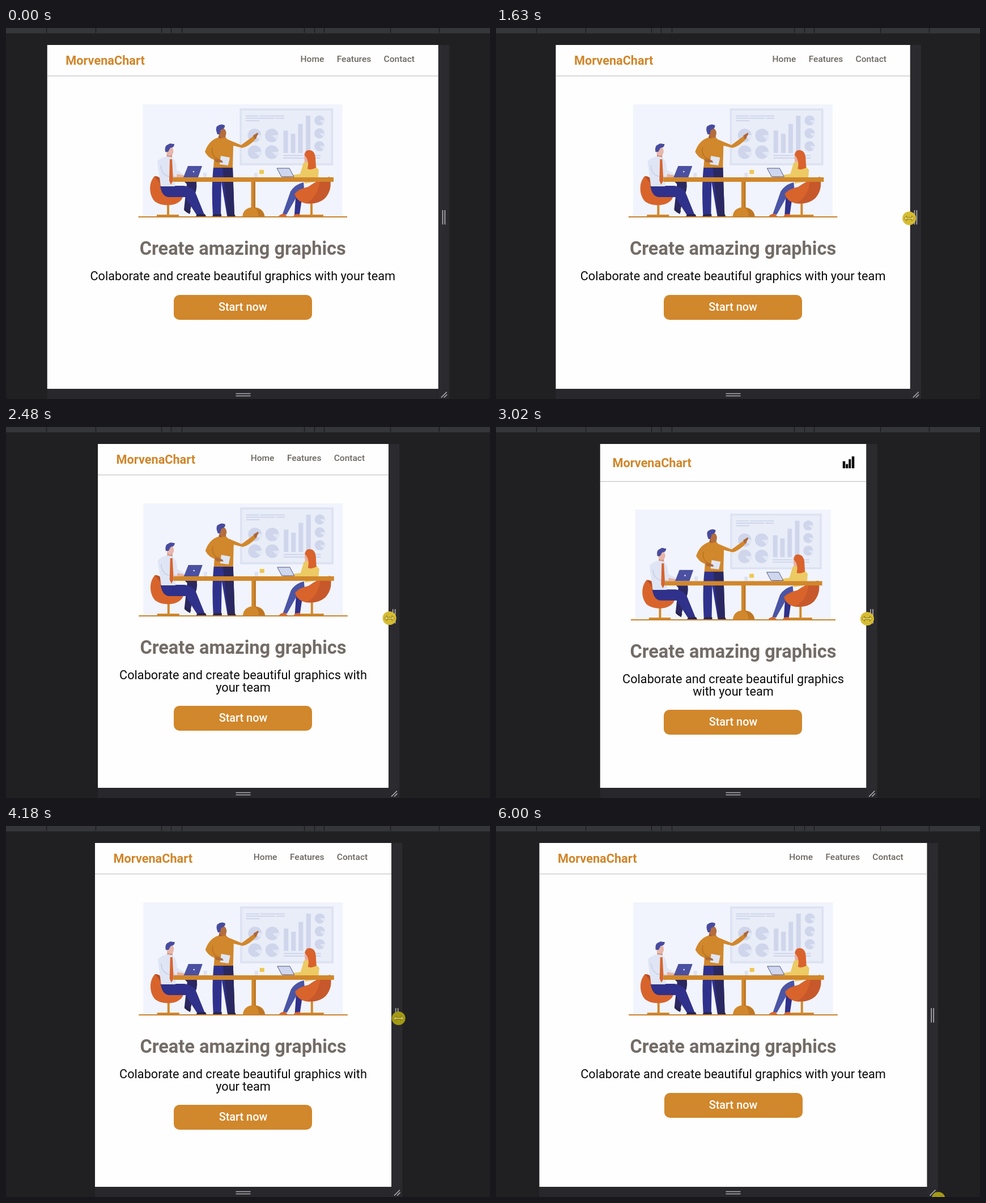
These frames come from a looping animation (854 px wide and 656 px high, 6.23 s). An HTML page:

```html
<!DOCTYPE html>
<html lang="en">
<head>
<meta charset="utf-8">
<title>Responsive page preview</title>
<style>
  html, body { margin: 0; width: 100%; height: 100%; overflow: hidden; background: #202022; }
  body { position: relative; font-family: Roboto, sans-serif; }
  svg { position: absolute; left: 0; top: 0; }
  .logo { font-size: 21.7px; font-weight: 700; fill: #d0862a; }
  .nav { font-size: 15.5px; font-weight: 500; fill: #6b665f; }
  #copy { position: absolute; box-sizing: border-box; padding: 0 34px; text-align: center; line-height: 1; }
  h1 { margin: 0; font-size: 32.55px; font-weight: 700; color: #736c66; }
  p { margin: 21.7px 0; font-size: 21.7px; color: #0c0a0a; }
  .button { display: flex; align-items: center; justify-content: center; width: 244px; height: 44px;
    margin: 0 auto; border-radius: 10px; background: #d1872b; color: #fff; font-size: 19.9px; font-weight: 500; }
</style>
</head>
<body>
<svg width="854" height="656" viewBox="0 0 854 656">
  <rect width="854" height="9.5" fill="#35363a"/>
  <path id="ticks" stroke="#19191b" stroke-width="1.2"/>
  <rect id="foot" y="638" height="18" fill="#28282c"/>
  <path d="M405.5 646.5h26m-26 4h26" stroke="#aeaeb0" stroke-width="1.7"/>
  <g id="grip">
    <rect id="bar" y="30" width="19.5" height="608"/>
    <rect y="638" width="19.5" height="18" fill="#2a2a2e"/>
    <path d="M7.7 322v25.5m4-25.5v25.5M5 653.5l10-10m-5 10l5.5-5.5" stroke="#aeaeb0" stroke-width="1.7"/>
  </g>
  <rect id="page" y="30" height="608" fill="#fefefe"/>
  <rect id="rule" height="1" fill="#b8b7b7"/>
  <text id="logo" class="logo">MorvenaChart</text>
  <g id="nav" class="nav">
    <text x="-243.2" y="60">Home</text><text x="-179" y="60">Features</text><text x="-96.2" y="60">Contact</text>
  </g>
  <path id="menu" d="M-41.5 60.5h4.5v12.5h-4.5zM-36 65.5h4v7.5h-4zM-31 57h4v16h-4zM-25.5 52h4.5v21h-4.5z" fill="#0b0a0a"/>

  <g id="scene">
    <path d="M241.5 135h352v198h-352z" fill="#f1f4fc"/>
    <path d="M414 144h161.5v97h-161.5z" fill="#e9edf8" stroke="#dce2f2" stroke-width="3.5"/>
    <g id="chart" fill="#cfd5eb">
      <path d="M423 154.5h23v2h-23zm25 0h43v2h-43zM423 158.5h51v2h-51zm53 0h15v2h-15zM423 163h24v2h-24z"/>
      <path d="M489.5 181.5h8v39.5h-8zM502.5 187h8v34h-8zM515.5 169.5h8v51.5h-8zM529 155h8v66h-8z"/>
      <path d="M489 224.5h36v2h-36zm38 0h28v2h-28zM489 229h66v2h-66z"/>
    </g>

    <!-- left chair and seated man -->
    <path d="M284 312h4v18h17v4h-39v-4h18z" fill="#d1872b"/>
    <path d="M262 262q14-1 18 22l-10 18z" fill="#b74f27"/>
    <path d="M262 262c-11 12-10 34 1 45q13 9 33 5 16-5 17-18l-31-3q-8-14-20-29z" fill="#d8642c"/>
    <path d="M315 272h21q2 16-6 29l-5 22-11-2 5-45z" fill="#2b2860"/>
    <path d="M272 279h42q16 2 21 14l15 37h-14l-20-31h-28q-13 0-16-20z" fill="#30318a"/>
    <path d="M316 319l10 4-2 6q-5-2-10-7zM337 329h14l2 4h-18z" fill="#272451"/>
    <path d="M284 222h9v10h-10z" fill="#d28f7c"/>
    <ellipse cx="289" cy="218" rx="6.5" ry="8" fill="#e7b6aa"/>
    <path d="M281 219q-2-11 5-13 3-3 8-1h3q0 7-7 7l-4 7z" fill="#484c9f"/>
    <path d="M283 227q-12 3-16 9l6 44h25l2-23 13 5 2-3-14-8q0-18-10-23z" fill="#dfe5f4"/>
    <path d="M273 243q1 15 12 19l17 1" fill="none" stroke="#c6cfe7" stroke-width="1.5"/>
    <path d="M301 258l14 3-1 3h-13z" fill="#e5b2a4"/>
    <path d="M289 232h4l2 38-4 7-3-7z" fill="#d8642c"/>

    <!-- presenter -->
    <path d="M366 246h34l3 86h-13l-10-60-1 60h-14q-3-50 1-86z" fill="#2f328c"/>
    <path d="M382 246h18l3 86h-12z" fill="#2a2860"/>
    <path d="M364 333q2-5 8-4h8v4zM390 333q2-5 13-4l2 4z" fill="#29264f"/>
    <path d="M376 188h11l1 11-15 1z" fill="#9b5930"/>
    <ellipse cx="382" cy="186" rx="6.5" ry="9" fill="#b46d3d"/>
    <path d="M373 188q-4-10-1-14 7-6 14-2 1 6-7 8l-2 8z" fill="#484c9f"/>
    <path d="M373 194q8 2 14-1l4 4 24 10 23-17 4 5q-14 15-25 17l-16-4-1 39h-34l1-14q-10-3-16-14 6-19 22-25z" fill="#d1872b"/>
    <path d="M364 211q-2 12 5 18l10 5" fill="none" stroke="#b87321" stroke-width="1.5"/>
    <path d="M436 190l8-5 1 2-4 8-3 1z" fill="#ad683b"/>
    <path d="M379 226l16 3-3 14-15-2z" fill="#dfe5f4"/>
    <path d="M367 231l14 3 2 4-13-1z" fill="#ad683b"/>

    <!-- right chair and seated woman -->
    <path d="M537 309h4v21h19v4h-41v-4h18z" fill="#d1872b"/>
    <path d="M512 284l12 5-6 41h-9z" fill="#2f318b"/>
    <path d="M525 273q-16 4-23 16l-14 40 7 1 19-34 13-2z" fill="#4b55a5"/>
    <path d="M481 333q4-5 11-4l4 4zM507 333q2-5 11-4l2 4z" fill="#d8642c"/>
    <path d="M526 222h11v17h-10z" fill="#e8af9c"/>
    <path d="M525 238q8-2 17 2l10 11-2 20-23 4-3-10q-14 3-27-1l2-3 20-3z" fill="#ecca64"/>
    <path d="M488 260l12 1-1 4-10-1z" fill="#e8af9c"/>
    <path d="M527 225q0-10 9-9 9 1 10 14l1 17q-9 5-15 2 3-12-2-20z" fill="#d9622d"/>
    <path d="M571 263q6 22-8 38-13 12-35 9-16-4-19-17 8-9 24-12 16-12 38-18z" fill="#c7582b"/>
    <path d="M554 270q-4 30-25 40-16-4-19-17 8-9 24-12 9-8 20-11z" fill="#d8642c"/>

    <!-- table -->
    <path d="M348 256h6v8h-6zM438 256h6v8h-6z" fill="#dce2f2"/>
    <path d="M449 246h4v4l3 3v11h-9v-11l2-3z" fill="#f7f3e9"/>
    <path d="M447 251h8v7h-8z" fill="#ebc75a"/>
    <path d="M321 244h25l-7 20h-26z" fill="#4b50a0"/>
    <circle cx="331" cy="254" r="1.3" fill="#e6e9f6"/>
    <path d="M478 248h22l8 15h-22z" fill="#cfd7ee" stroke="#51557f"/>
    <path d="M295 264h283v8h-283zM432.5 272h7.5v48h-7.5z" fill="#d1872b"/>
    <path d="M417 334q2-17 19.5-17t20 17z" fill="#d1872b"/>
    <path d="M437 272h3v46q15 3 16.5 16h-11q0-13-8.5-17z" fill="#bd7724"/>
    <path d="M233.5 333h368.5v2h-368.5z" fill="#c9822d"/>
  </g>

  <g id="cursor">
    <circle r="12"/>
    <path d="M-9 0l4.5-4.5v3h9v-3l4.5 4.5-4.5 4.5v-3h-9v3z" fill="#f3e58b" fill-opacity=".55" stroke="#7c6d16" stroke-width=".9"/>
  </g>
</svg>
<div id="copy">
  <h1>Create amazing graphics</h1>
  <p>Colaborate and create beautiful graphics with your team</p>
  <div class="button">Start now</div>
</div>
<script>
const LOOP = 6230, STEP = 80, BREAKPOINT = 489;
const $ = id => document.getElementById(id);
const set = (id, attrs) => { for (const k in attrs) $(id).setAttribute(k, attrs[k]); };
const show = (id, on) => set(id, { visibility: on ? 'visible' : 'hidden' });
const move = (id, x, y = 0) => set(id, { transform: `translate(${x} ${y})` });

// progress from a to b, easing out when power > 1
const ramp = (t, a, b, power = 1) => 1 - (1 - Math.min(1, Math.max(0, (t - a) / (b - a)))) ** power;

// drag inwards fast, then slowly, then back out
const middle = t => 417.75 + .75 * ramp(t, 1256, 2000);
const half = t => 345 - 70 * ramp(t, 1256, 2000) - 65 * ramp(t, 2000, 3680) + 132 * ramp(t, 3840, 4980, 1.5);
const rightEdge = t => middle(t) + half(t);

// the pointer comes up from below, runs ahead of the edge, then swings away
function pointer(t) {
  const enter = 1 - ramp(t, 220, 680), leave = ramp(t, 5060, 5750);
  return [
    rightEdge(t + 60) + 4 - 10 * enter + 16 * leave + 50 * Math.sin(Math.PI * leave),
    336 + 249 * enter + 4 * ramp(t, 1256, 3720) + 319 * leave
  ];
}

function pointerColour(t) {
  const olive = t >= 3870 && t < 5140 || t >= 6000;
  return olive ? '#a39a14' : t >= 1010 && t < 1330 ? '#c4c11d' : '#d6bc33';
}

function draw(now) {
  const clock = now % LOOP, t = Math.floor((clock + 20) / STEP) * STEP;
  const mid = middle(t), left = mid - half(t), right = rightEdge(t), width = right - left;
  const mobile = width < BREAKPOINT, line = mobile ? 96 : 84.5;
  const scale = Math.min(1, width * .769 / 368.5);

  set('page', { x: left, width });
  set('foot', { x: left, width });
  set('rule', { x: left, y: line - .2, width });
  set('bar', { fill: clock >= 680 && clock < 1330 ? '#36373b' : '#2a2a2f' });
  set('logo', { x: left + (mobile ? 21.7 : 32.5), y: mobile ? 70.5 : 65 });
  for (const id of ['grip', 'nav', 'menu']) move(id, right);
  show('nav', !mobile);
  show('menu', mobile);
  set('scene', { transform: `translate(${mid} ${line + 28}) scale(${scale}) translate(-417.75 -112.5)` });

  const box = $('copy').style;
  box.left = left + 'px';
  box.width = width + 'px';
  box.top = line + 54.6 + 235 * scale + 'px';

  show('cursor', clock >= 220);
  move('cursor', ...pointer(t));
  set('cursor', { fill: pointerColour(clock) });
  requestAnimationFrame(draw);
}

set('ticks', { d: [71, 158, 274, 291, 310, 526, 544, 561, 678, 764].map(x => `M${x + .5} 0v8.5`).join('') });

const pie = (x, y, r) => `<circle cx="${x}" cy="${y}" r="${r}"/>
  <path d="M${x} ${y}l${r} ${-r * .1}a${r} ${r} 0 0 1 ${-r * .25} ${r * .75}z" fill="#e2e7f5"/>`;
let pies = '';
for (let i = 0; i < 4; i++) pies += pie(438.5 + 30.5 * (i % 2), 190 + 29.5 * (i >> 1), 12);
for (let i = 0; i < 3; i++) pies += pie(553, 163.5 + 22.8 * i, 9);
$('chart').innerHTML += pies;

draw(0);
</script>
</body>
</html>
```
